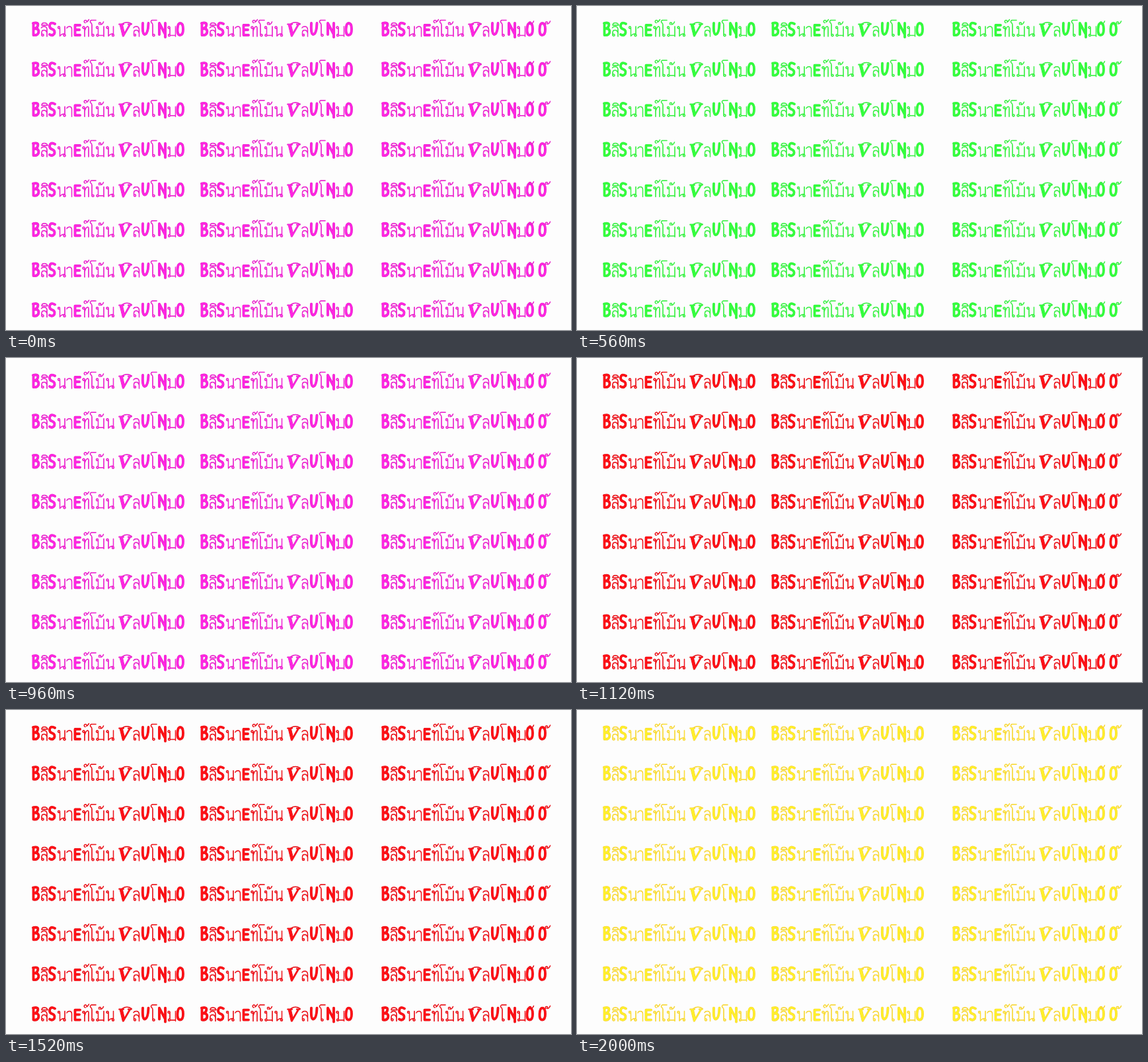
Write an HTML page with a canvas that moves like this. It is 855x490 px and loops after 2040 ms.

```html
<!DOCTYPE html>
<html lang="th">
<head>
<meta charset="utf-8">
<title>Blinking names</title>
<style>
html, body { margin: 0; width: 100%; height: 100%; overflow: hidden; background: #fdfdfd; }
canvas { display: block; }
</style>
</head>
<body>
<canvas id="stage" width="855" height="490" role="img" aria-label="Bลิsนาeท์โม้น Vลuโnมo"></canvas>
<script>
const ctx = document.getElementById('stage').getContext('2d');

// Fill and edge colour of each blink, and their order (40 ms each)
const COLORS = {
  M: ['#ff25e2', '#dc22bf'],
  G: ['#33ff3c', '#45e650'],
  Y: ['#fff02a', '#f3c840'],
  R: ['#ff1016', '#dc161f']
};
const ORDER = 'MGYMRGYMRMGRYMGRY';
const LOOP = 2040, STEP = 40;
const COLUMNS = [0, 255, 529], ROWS = 8, ROW_GAP = 60.65;
const THIN = 1.5, HEAVY = 3.8;

const ring = (x, y) => `M${x - 1.5} ${y}a1.5 1.5 0 1 1 3 0a1.5 1.5 0 1 1 -3 0`;

// Thin letters, each drawn at its first place in the line
const lo = ring(55.5, 44) + 'M54 44V40Q54 36.5 57.5 36.5Q61 36.5 62 41M62 46V36Q62 31 57.5 31Q54.5 31 53.5 33';
const no = ring(80, 32.5) + 'M81.5 33V45.5Q84 42 88 42M89 31V43' + ring(88.5, 44.3);
const mo = ring(138, 32.5) + 'M139.5 32.5V43' + ring(138.5, 44.3) + 'M140 44.5H148M148 31V46';
const tho = ring(117.5, 32.5) + 'M119 32.5V46M119 38Q121 31 123.5 31Q125 31 125 34V46';
const oh = 'M136 21.5H129Q126.5 23 128 25Q130 26 130 29V44' + ring(131.5, 44.3);
const aa = 'M92 33.5Q93 31 96 31Q99.5 31 99.5 35V46';
const iMark = 'M54 29Q54 25.5 58 25.5Q62 25.5 63 29Z';
const topMark = 'M120 25.5a2 2 0 1 1 2 -1Q124 23 125.5 20.5';
const tone = 'M141 28q-1.5 -3 1 -3t1 3q3 0 4.5 -4';
const hat = 'M176 27Q183 22.5 190 27';

// Heavy letters
const B = 'M41.5 26V44M41 26Q50 24 48 30Q47 34 43 34Q51 34 49 41Q47 45 42 44';
const S = 'M74 27Q67 23 66 30Q66 34 70 35Q75 37 73 42Q70 46 66 43';
const E = 'M112 29H104.5V44H112M105 36H111';
const U = 'M207 26Q206 43 210 43Q215 42 215.5 26';
const N = 'M232 43V26L241 43M241 26V47';
const O = 'M263.5 26Q268 26 268 35T263.5 44T259.5 35T263.5 26';

function join(...parts) {
  const path = new Path2D();
  for (const [d, dx = 0, dy = 0] of parts) path.addPath(new Path2D(d), new DOMMatrix([1, 0, 0, 1, dx, dy]));
  return path;
}

const thin = join([lo], [iMark], [no], [aa], [tho], [topMark], [oh], [mo], [tone],
  [no, 73.5], [hat], [lo, 139.5], [oh, 92], [mo, 108.5]);
const heavy = join([B], [S], [E], [U], [N], [O]);
const extraThin = join([tone, 122, -1], [tone, 147, -1]);
const extraHeavy = join([O, 19]);

function stroke(path, width, [fill, edge]) {
  ctx.strokeStyle = edge;
  ctx.lineWidth = width;
  ctx.stroke(path);
  ctx.strokeStyle = fill;
  ctx.lineWidth = width - 0.8;
  ctx.stroke(path);
}

function drawName(x, y, color, extra) {
  ctx.setTransform(1, 0, 0, 1, x, y);
  stroke(thin, THIN, color);
  stroke(heavy, HEAVY, color);
  if (extra) {
    stroke(extraThin, THIN, color);
    stroke(extraHeavy, HEAVY, color);
  }
  ctx.lineWidth = 1;
  ctx.strokeStyle = color[1];
  ctx.fillStyle = color[0];
  ctx.strokeText('V', 169, 46);
  ctx.fillText('V', 169, 46);
}

let shown = -1;
function frame() {
  const step = Math.floor(performance.now() % LOOP / STEP);
  if (step !== shown) {
    shown = step;
    const color = COLORS[ORDER[step % ORDER.length]];
    ctx.setTransform(1, 0, 0, 1, 0, 0);
    ctx.fillStyle = '#fdfdfd';
    ctx.fillRect(0, 0, 855, 490);
    ctx.font = 'italic bold 29px "Liberation Serif", serif';
    ctx.lineCap = ctx.lineJoin = 'round';
    for (let row = 0; row < ROWS; row++)
      COLUMNS.forEach((x, i) => drawName(x, row * ROW_GAP, color, i === 2));
  }
  requestAnimationFrame(frame);
}
frame();
</script>
</body>
</html>
```
